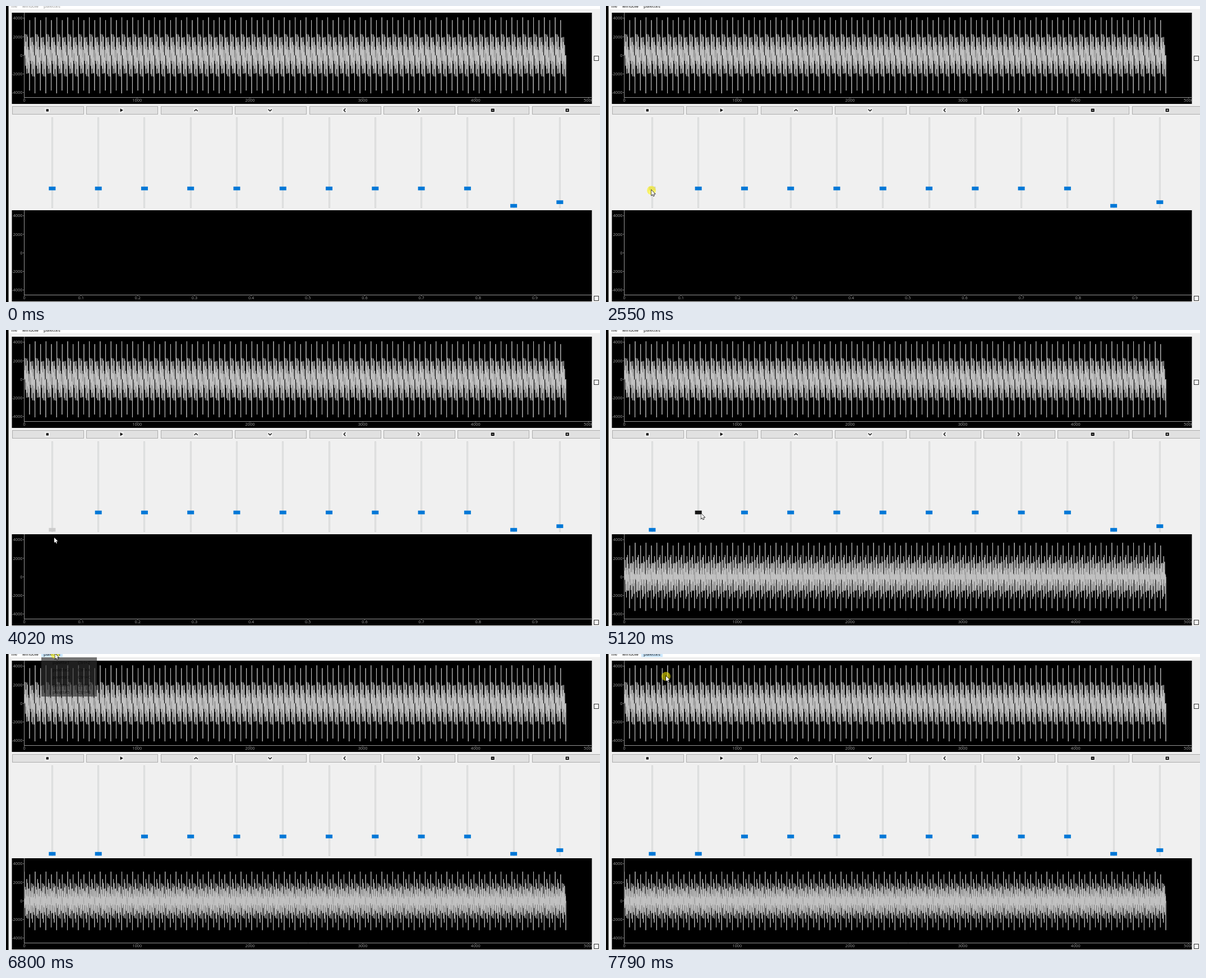
Animation, 1059 px wide and 529 px high, one loop 7990 ms. Source, as an HTML page with a canvas:

```html
<!DOCTYPE html>
<html lang="en">
<head>
<meta charset="utf-8">
<title>Equaliser</title>
<style>
  html, body { margin: 0; width: 100%; height: 100%; overflow: hidden; background: #f0f0f0; }
  canvas { display: block; width: 100vw; height: 100vh; }
</style>
</head>
<body>
<canvas id="stage" width="1059" height="529"></canvas>
<script>
const W = 1059, H = 529, LOOP = 7990, STEP = 67;
const LEFT = 32.5, SCALE = 0.0166;
const TICK_FONT = '7.4px "Noto Sans", "Open Sans", sans-serif';
const MENU_FONT = '8px "Open Sans", "Noto Sans", sans-serif';
const ctx = document.getElementById('stage').getContext('2d');
const clamp = (v, lo, hi) => Math.min(hi, Math.max(lo, v));
const within = (t, a, b) => t >= a && t < b;
const range = n => [...Array(n).keys()];

function layer(paint) {
  const c = document.createElement('canvas');
  c.width = W; c.height = H;
  paint(c.getContext('2d'));
  return c;
}
function rect(g, x, y, w, h, fill, border) {
  g.fillStyle = border || fill;
  g.fillRect(x, y, w, h);
  if (border) { g.fillStyle = fill; g.fillRect(x + 1, y + 1, w - 2, h - 2); }
}
function path(g, points, color, width = 1) {
  g.beginPath();
  points.forEach(([x, y]) => g.lineTo(x, y));
  g.strokeStyle = color; g.lineWidth = width; g.lineJoin = 'bevel';
  g.stroke();
}
function text(g, str, x, y, font, color, align = 'left', base = 'alphabetic') {
  g.font = font; g.fillStyle = color; g.textAlign = align; g.textBaseline = base;
  g.fillText(str, x, y);
}

// Pulses every millisecond at 48 kHz over a beating body; low and mid are the two lowest bands.
function signal(n, low, mid) {
  const a = 2 * Math.PI * n / 48, phase = n % 48;
  if (phase === 1 || phase === 47) {
    const peak = 3000 + 420 * low + 520 * mid + 150 * Math.cos(Math.round(n / 48) * Math.PI);
    return phase === 1 ? peak : -peak;
  }
  const carrier = 0.6 * Math.sin(11.5 * a) + 0.4 * Math.sin(7 * a);
  const swell = 900 + 1500 * Math.abs(Math.sin(a / 2));
  return 500 * low * Math.sin(a) + 450 * mid * Math.sin(2 * a) + swell * carrier;
}

function plot(top, tickGap, tickUnit, gains) {
  return layer(g => {
    const zero = top + 76.2, axis = top + 151.5;
    g.beginPath();
    g.rect(10.5, top, 1034, 163);
    g.clip();
    rect(g, 0, 0, W, H, '#000');
    if (gains)
      path(g, range(4801).map(n => [LEFT + n * 0.2012, zero - signal(n, ...gains) * SCALE]), '#c8c8c8', 0.9);
    path(g, [[LEFT, top], [LEFT, axis], [1044, axis]], '#969696');
    for (let v = -4000; v <= 4000; v += 2000) {
      const y = zero - v * SCALE;
      text(g, v, 29.5, y + 0.5, TICK_FONT, '#969696', 'right', 'middle');
      path(g, [[30, y], [LEFT, y]], '#808080');
    }
    for (let i = 0, x = LEFT; x < 1042; x = LEFT + ++i * tickGap) {
      text(g, +(i * tickUnit).toFixed(1), x, axis + 5, TICK_FONT, '#969696', 'center', 'middle');
      path(g, [[x, axis], [x, axis + 2]], '#808080');
    }
  });
}
const sampled = (top, gains) => plot(top, 201.2, 1000, gains);
const input = sampled(12, [1, 1]);
const outputs = [plot(365, 101.15, 0.1), sampled(365, [0, 1]), sampled(365, [0, 0])];

// Icons are drawn around the origin.
function chevron(g, turns) {
  g.rotate(turns * Math.PI / 2);
  path(g, [[-3, 1.5], [0, -1.4], [3, 1.5]], '#111', 1.4);
}
function sign(g, plus) {
  rect(g, -3, -2.8, 6, 5.6, '#000');
  rect(g, -1.6, -0.5, 3.2, 1, '#ddd');
  if (plus) rect(g, -0.5, -1.6, 1, 3.2, '#ddd');
}
const icons = [
  g => rect(g, -2, -2, 4.2, 4.2, '#000'),
  g => { g.beginPath(); g.moveTo(-2, -3); g.lineTo(3, 0); g.lineTo(-2, 3); g.fill(); },
  g => chevron(g, 0), g => chevron(g, 2), g => chevron(g, 3), g => chevron(g, 1),
  g => sign(g, false), g => sign(g, true)
];

const sliderX = i => 82.4 + i * 82.27;
const backdrop = layer(g => {
  rect(g, 0, 0, W, H, '#f0f0f0');
  rect(g, 0, 0, W, 5.5, '#fff');
  rect(g, 0, 0, 4.5, H, '#000');
  icons.forEach((icon, i) => {
    const x = Math.round(11 + i * 132.4);
    rect(g, x, 179, 128, 15, '#e1e1e1', '#adadad');
    rect(g, x + 58, 182, 9, 9, '#eeeeee');
    g.save();
    g.translate(x + 62.7, 186.3);
    g.fillStyle = '#000';
    icon(g);
    g.restore();
  });
  range(12).forEach(i => rect(g, Math.round(sliderX(i) - 1.5), 199, 3, 162, '#e7eaea', '#d6d6d6'));
  [89, 518].forEach(y => rect(g, 1048, y, 9, 9, '#fff', '#333'));
  g.drawImage(input, 0, 0);
});

// Each glide runs from the previous resting place to (x, y), bowed vertically by bend.
const glides = [
  { start: 150, end: 210, x: 664, y: 478 },
  { start: 540, end: 670, x: 240, y: 376 },
  { start: 930, end: 1600, x: 81, y: 329, bend: -70 },
  { start: 3010, end: 3740, x: 81, y: 326, bend: -101 },
  { start: 3810, end: 3950, x: 86, y: 371 },
  { start: 4500, end: 5120, x: 169.5, y: 328 },
  { start: 5580, end: 5720, x: 171, y: 384 },
  { start: 6130, end: 6130, x: 101, y: 138 },
  { start: 6200, end: 6200, x: 98, y: 0 },
  { start: 6400, end: 6600, x: 87.5, y: -0.5 },
  { start: 7070, end: 7620, x: 107, y: 39.5 }
];
function pointer(t) {
  if (t < 150 || within(t, 6200, 6400)) return null;
  let from = { x: 790, y: 495 }, now = from;
  for (const g of glides) {
    if (g.start > t) break;
    const steps = Math.round((g.end - g.start) / STEP) + 1;
    const p = Math.min(1, (Math.floor((t - g.start) / STEP + 0.05) + 1) / steps);
    now = {
      x: from.x + (g.x - from.x) * p,
      y: from.y + (g.y - from.y) * p + (g.bend || 0) * Math.sin(Math.PI * p)
    };
    from = g;
  }
  return now;
}

const drags = [
  { press: 2550, drag: 3010, drop: 4020, release: 4090 },
  { press: 5380, drag: 5580, drop: 5790, release: 5860 }
];
function handle(i, t, at) {
  const d = drags[i];
  let y = i === 10 ? 357 : i === 11 ? 350.5 : 326;
  let color = '#0078d7';
  if (d) {
    if (t >= d.release) y = 357;
    else if (t >= d.drag) y = clamp(at.y - 2.5, 202, 357);
    const hover = at && Math.abs(at.x - sliderX(i)) < 6.5 && Math.abs(at.y - y) < 4;
    if (within(t, d.press, d.release)) color = '#cccccc';
    else if (hover) color = '#171717';
  }
  rect(ctx, sliderX(i) - 6, y - 3.2, 12, 6.6, color);
}

function popup(t, at) {
  if (!within(t, 6800, 7790)) return;
  const shade = clamp((t - 6800) / 130, 0, 1);
  const tone = Math.round(48 + 194 * shade);
  ctx.globalAlpha = 0.65 + 0.35 * shade;
  rect(ctx, 63, 6, 99, 70, `rgb(${tone}, ${tone}, ${tone})`);
  [...'ZXCVB'].forEach((key, i) => {
    const y = 14.5 + i * 13.4;
    if (t >= 7070 && Math.abs(at.y - y) < 6.7) rect(ctx, 65, y - 6.5, 95, 13, '#91c9f7');
    text(ctx, 'palette' + (i + 1), 83, y + 3, MENU_FONT, '#000');
    text(ctx, 'Ctrl+' + key, 128, y + 3, MENU_FONT, '#000');
  });
  ctx.globalAlpha = 1;
}

const ARROW = new Path2D('M0 0V9.3L2.1 7.3L3.6 10.6L5 10L3.6 6.8L6.5 6.6Z');
function cursor(at, pressed) {
  ctx.save();
  ctx.translate(at.x, at.y);
  if (pressed) {
    ctx.fillStyle = 'rgba(255, 245, 0, 0.56)';
    ctx.beginPath();
    ctx.arc(0, 0.5, 8, 0, 7);
    ctx.fill();
  }
  ctx.strokeStyle = '#000'; ctx.lineWidth = 1.3;
  ctx.stroke(ARROW);
  ctx.fillStyle = '#fff';
  ctx.fill(ARROW);
  ctx.restore();
}

function draw(t) {
  const at = pointer(t);
  ctx.drawImage(backdrop, 0, 0);
  ctx.drawImage(outputs[drags.filter(d => t >= d.release).length], 0, 0);

  if (t >= 6465) rect(ctx, 63, 0, 38, 5.5, '#cce8ff');
  const ink = t < 2550 ? '#8c8c8c' : '#000';
  text(ctx, 'file', 9, 2.8, MENU_FONT, ink);
  text(ctx, 'window', 29, 2.8, MENU_FONT, ink);
  text(ctx, 'palettes', 67, 2.8, MENU_FONT, ink);

  range(12).forEach(i => handle(i, t, at));
  popup(t, at);
  const pressed = drags.some(d => within(t, d.press, d.drop)) || within(t, 6800, 6930) || t >= 7790;
  if (at) cursor(at, pressed);
}

const begin = performance.now();
function tick() {
  draw((performance.now() - begin) % LOOP);
  requestAnimationFrame(tick);
}
draw(0);
requestAnimationFrame(tick);
</script>
</body>
</html>
```
